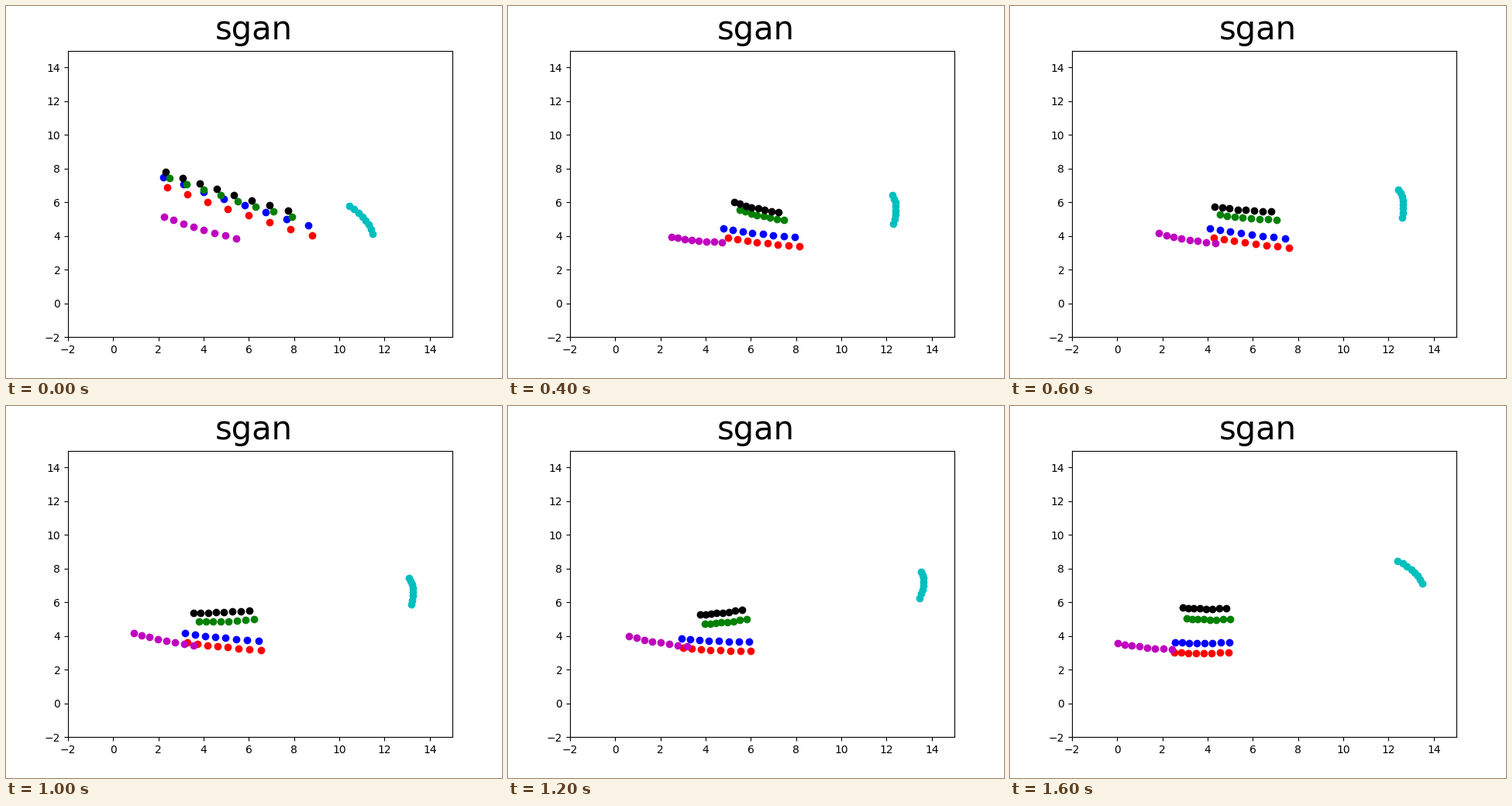
A matplotlib script that plays this animation: 640 by 480 pixels, repeating every 1800 ms.

```python
import numpy as np
import matplotlib.pyplot as plt
from matplotlib.animation import FuncAnimation

STEPS = 9
DOTS = 8
LOW, HIGH = -2, 15

# Lengths and places are in stage pixels, y pointing down.
# Where each walker stands at a few steps of the loop.
TRACK_STEPS = (0, 2, 6, 8)
TRACKS = {
    "r": [(395, 296), (376, 310), (313, 316), (282, 318)],
    "b": [(390, 283), (370, 298), (311, 304), (283, 305)],
    "g": [(369, 272), (356, 276), (308, 275), (284, 275)],
    "k": [(364, 264), (349, 266), (302, 263), (279, 261)],
    "m": [(297, 300), (276, 305), (231, 310), (209, 314)],
    "c": [(473, 294), (497, 281), (531, 248), (532, 229)],
}

# How far the forecast reaches; people walking side by side share one.
REACH_STEPS = (0, 1, 2, 4, 6, 8)
FRONT = [(-187, -62), (-133, -11), (-92, -11), (-102, -15), (-87, -4), (-70, 0)]
BACK = [(-158, -50), (-89, -3), (-57, -13), (-89, 0), (-54, 6), (-56, -1)]
LONE = [(-93, -28), (-77, -20), (-65, -7), (-80, -19), (-75, -13), (-70, -8)]
AWAY = [(-30, -36), (-5, -39), (-1, -37), (-8, -35), (2, -34), (-32, -29)]
REACHES = dict(r=FRONT, b=FRONT, g=BACK, k=BACK, m=LONE, c=AWAY)

# Sideways bulge of a forecast at its middle.
BOW = (-2, 1)
AWAY_BOW = (4, -1.5)

fig, ax = plt.subplots(figsize=(6.4, 4.8), dpi=100)
fig.suptitle("sgan", fontsize=30)
ax.set_xlim(LOW, HIGH)
ax.set_ylim(LOW, HIGH)
lines = {color: ax.plot([], [], color + "o")[0] for color in TRACKS}


def between(step, steps, points):
    return np.array([np.interp(step, steps, axis) for axis in zip(*points)])


def to_data(x, y):
    span = HIGH - LOW
    return LOW + (x - 80) * span / 496, LOW + (427.2 - y) * span / 369.6


def forecast(color, step):
    start = between(step, TRACK_STEPS, TRACKS[color])
    reach = between(step, REACH_STEPS, REACHES[color])
    bow = np.array(AWAY_BOW if color == "c" else BOW)
    t = np.linspace(0, 1, DOTS)[:, None]
    dots = start + reach * t + bow * 4 * t * (1 - t)
    return to_data(*dots.T)


def draw(step):
    for color, line in lines.items():
        line.set_data(*forecast(color, step))
    return list(lines.values())


anim = FuncAnimation(fig, draw, frames=STEPS, interval=200,
                     repeat=True, repeat_delay=0)
plt.show()
```
